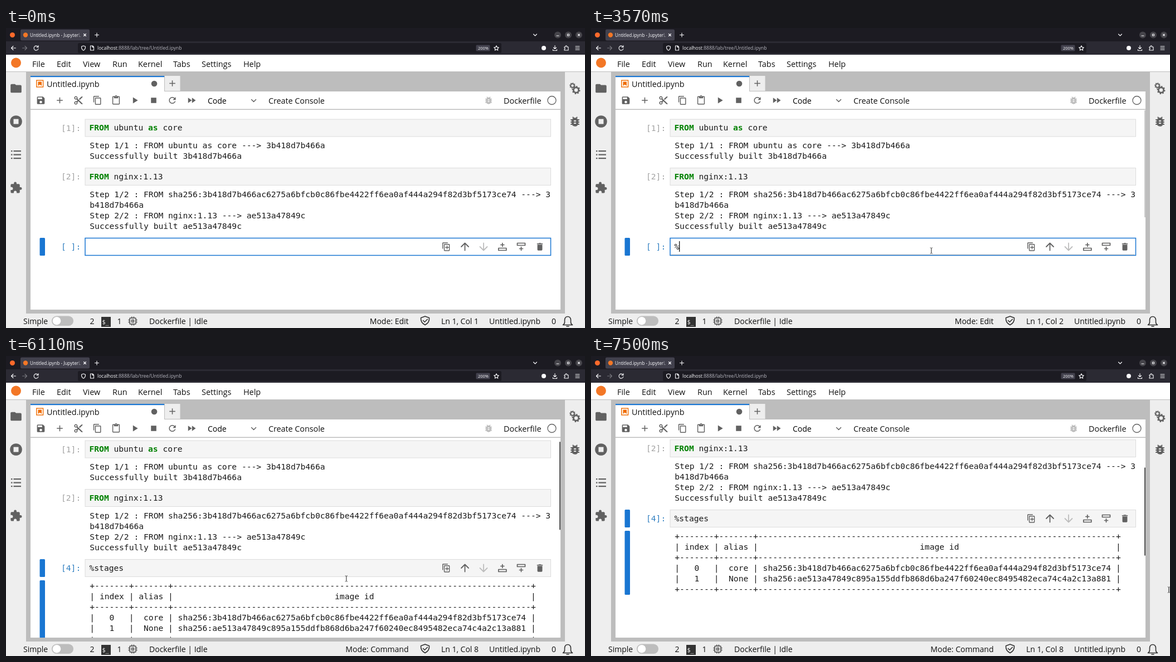
An HTML page for the animation above (8.44 s loop, 1039 by 539 pixels).

```html
<!DOCTYPE html>
<html lang="en">
<head>
<meta charset="utf-8">
<title>Notebook stages</title>
<style>
html, body { margin: 0; width: 100%; height: 100%; overflow: hidden; background: #fff; }
svg { display: block; }
text { white-space: pre; font-family: "Open Sans", "Noto Sans", sans-serif; }
.mono { font-family: "DejaVu Sans Mono", monospace; font-size: 14.617px; }
.kw { fill: #008000; font-weight: bold; }
.line { fill: none; stroke-linecap: round; stroke-linejoin: round; }
</style>
</head>
<body>
<svg id="stage" width="1039" height="539" viewBox="0 0 1039 539">
  <defs><clipPath id="view"><rect x="44" y="147" width="951" height="359"/></clipPath></defs>
</svg>
<script>
const LOOP = 8440, CHAR = 8.8, GREY = '#616161', BLUE = '#1976d2';
const stage = document.getElementById('stage');

const rect = (x, y, w, h, fill, more = '') =>
  `<rect x="${x}" y="${y}" width="${w}" height="${h}" fill="${fill}" ${more}/>`;
const circle = (x, y, r, fill, more = '') =>
  `<circle cx="${x}" cy="${y}" r="${r}" fill="${fill}" ${more}/>`;
const text = (x, y, s, size = 14.4, fill = '#111', more = '') =>
  `<text x="${x}" y="${y}" font-size="${size}" fill="${fill}" ${more}>${s}</text>`;
const mono = (x, y, s, fill = '#1a1a1a', more = '') =>
  `<text class="mono" x="${x}" y="${y}" fill="${fill}" ${more}>${s}</text>`;
const line = (d, color = GREY, width = 1.8, more = '') =>
  `<path class="line" d="${d}" stroke="${color}" stroke-width="${width}" ${more}/>`;
// Filled icon on a 24 unit grid, centred on x, y
const icon = (d, x, y, scale = .76, fill = GREY) =>
  `<path d="${d}" fill="${fill}" fill-rule="evenodd" transform="translate(${x} ${y}) scale(${scale}) translate(-12 -12)"/>`;

const SAVE = 'M17 3H5c-1.11 0-2 .9-2 2v14c0 1.1.89 2 2 2h14c1.1 0 2-.9 2-2V7l-4-4zm-5 16c-1.66 0-3-1.34-3-3s1.34-3 3-3 3 1.34 3 3-1.34 3-3 3zm3-10H5V5h10v4z';
const PLUS = 'M19 13h-6v6h-2v-6H5v-2h6V5h2v6h6v2z';
const CUT = 'M9.64 7.64c.23-.5.36-1.05.36-1.64 0-2.21-1.79-4-4-4S2 3.79 2 6s1.79 4 4 4c.59 0 1.14-.13 1.64-.36L10 12l-2.36 2.36C7.14 14.13 6.59 14 6 14c-2.21 0-4 1.79-4 4s1.79 4 4 4 4-1.79 4-4c0-.59-.13-1.14-.36-1.64L12 14l7 7h3v-1L9.64 7.64zM6 8a2 2 0 1 1 0-4 2 2 0 0 1 0 4zm0 12a2 2 0 1 1 0-4 2 2 0 0 1 0 4zM19 3l-6 6 2 2 7-7V3z';
const COPY = 'M16 1H4c-1.1 0-2 .9-2 2v14h2V3h12V1zm3 4H8c-1.1 0-2 .9-2 2v14c0 1.1.9 2 2 2h11c1.1 0 2-.9 2-2V7c0-1.1-.9-2-2-2zm0 16H8V7h11v14z';
const PASTE = 'M19 2h-4.18C14.4.84 13.3 0 12 0c-1.3 0-2.4.84-2.82 2H5c-1.1 0-2 .9-2 2v16c0 1.1.9 2 2 2h14c1.1 0 2-.9 2-2V4c0-1.1-.9-2-2-2zm-7 0a1 1 0 1 1 0 2 1 1 0 0 1 0-2zm7 18H5V4h2v3h10V4h2v16z';
const REFRESH = 'M17.65 6.35C16.2 4.9 14.21 4 12 4c-4.42 0-7.99 3.58-7.99 8s3.57 8 7.99 8c3.73 0 6.84-2.55 7.73-6h-2.08c-.82 2.33-3.04 4-5.65 4-3.31 0-6-2.69-6-6s2.69-6 6-6c1.66 0 3.14.69 4.22 1.78L13 11h7V4l-2.35 2.35z';
const FORWARD = 'M4 18l8.5-6L4 6v12zm9-12v12l8.5-6L13 6z';
const BUG = 'M20 8h-2.81c-.45-.78-1.07-1.45-1.82-1.96L17 4.41 15.59 3l-2.17 2.17C12.96 5.06 12.49 5 12 5c-.49 0-.96.06-1.41.17L8.41 3 7 4.41l1.62 1.63C7.88 6.55 7.26 7.22 6.81 8H4v2h2.09c-.05.33-.09.66-.09 1v1H4v2h2v1c0 .34.04.67.09 1H4v2h2.81c1.04 1.79 2.97 3 5.19 3s4.15-1.21 5.19-3H20v-2h-2.09c.05-.33.09-.66.09-1v-1h2v-2h-2v-1c0-.34-.04-.67-.09-1H20V8zm-6 8h-4v-2h4v2zm0-4h-4v-2h4v2z';
const FOLDER = 'M10 4H4c-1.1 0-2 .9-2 2v12c0 1.1.9 2 2 2h16c1.1 0 2-.9 2-2V8c0-1.1-.9-2-2-2h-8l-2-2z';
const PUZZLE = 'M20.5 11H19V7c0-1.1-.9-2-2-2h-4V3.5a2.5 2.5 0 0 0-5 0V5H4c-1.1 0-2 .9-2 2v3.8h1.5a2.7 2.7 0 0 1 0 5.4H2V20c0 1.1.9 2 2 2h3.8v-1.5a2.7 2.7 0 0 1 5.4 0V22H17c1.1 0 2-.9 2-2v-4h1.5a2.5 2.5 0 0 0 0-5z';
const CHIP = 'M15 9H9v6h6V9zm-2 4h-2v-2h2v2zm8-2V9h-2V7c0-1.1-.9-2-2-2h-2V3h-2v2h-2V3H9v2H7c-1.1 0-2 .9-2 2v2H3v2h2v2H3v2h2v2c0 1.1.9 2 2 2h2v2h2v-2h2v2h2v-2h2c1.1 0 2-.9 2-2v-2h2v-2h-2v-2h2zm-4 6H7V7h10v10z';
const TRASH = 'M6 19c0 1.1.9 2 2 2h8c1.1 0 2-.9 2-2V7H6v12zM19 4h-3.5l-1-1h-5l-1 1H5v2h14V4z';

const gear = (x, y, r) =>
  circle(x, y, r, 'none', `stroke="${GREY}" stroke-width="${r * .6}"`) +
  circle(x, y, r * 1.4, 'none', `stroke="${GREY}" stroke-width="${r * .45}" pathLength="16" stroke-dasharray="1 1"`);

function browser() {
  const ink = '#fbfbfe', thin = (d, c = ink) => line(d, c, 1.1);
  return rect(0, 0, 1039, 24, '#1c1b22') + rect(0, 24, 1039, 24, '#2b2a33') +
    circle(11.5, 12.5, 4.5, '#ff6a2b') +
    rect(26, 2.5, 124, 20, '#42414d', 'rx="2.5"') + circle(35, 12.5, 4.2, '#f37726') +
    text(43, 15.6, 'Untitled.ipynb - Jupyter<tspan fill="#99989f">L</tspan>', 8.15, ink) +
    thin('M139.5 10.5l4 4m0-4l-4 4M159.5 12.5h7m-3.5-3.5v7M946.500 11l3 3 3-3') +
    [990, 1009, 1028].map(x => circle(x, 12.500, 6, '#45444a')).join('') +
    thin('M988 14h4M1007.500 11h3v3h-3zM1026.500 11l3 3m0-3l-3 3') +
    thin('M17.500 36h-8m3.500-3.500l-3.500 3.500 3.500 3.500M57.500 34a4 4 0 1 0 .5 3M58 31.500v3h-3') +
    thin('M29.500 36h8m-3.500-3.500l3.500 3.500-3.500 3.500', '#77767e') +
    rect(129, 27, 760, 18, '#1c1b22', 'rx="2.5"') +
    thin('M139 32l3.500 1.200q.3 5-3.500 7-3.800-2-3.500-7zM151.500 32h4l2 2v6h-6zM155 32v2.500h2.500') +
    text(164, 39, 'localhost<tspan fill="#b5b5be">:8888/lab/tree/Untitled.ipynb</tspan>', 8.57, ink) +
    rect(843.5, 30.500, 25, 11, '#42414d', 'rx="1.5"') + text(847, 39, '200%', 7.4, ink) +
    thin('M880 31.800l1.300 2.800 3 .4-2.200 2.100.6 3-2.700-1.500-2.700 1.500.6-3-2.200-2.100 3-.4z') +
    circle(965, 36, 4, ink) +
    thin('M985 31.500v6m-2.500-2.500l2.500 2.500 2.500-2.500M981.500 38.500v2h7v-2') +
    thin('M1002 34h2v-1.500q1.500-1.500 2.500 0V34h2.500v6h-7v-2q2.500-1 0-2.500z') +
    thin('M1022 33h7m-7 3h7m-7 3h7');
}

function shell() {
  const menu = [[47, 'File'], [91, 'Edit'], [138, 'View'], [191, 'Run'], [237, 'Kernel'],
    [300, 'Tabs'], [351, 'Settings'], [426, 'Help']];
  const rows = [221, 227.500, 234];
  return rect(0, 48, 1039, 31, '#fff') + circle(18, 62.500, 9, '#f37726') +
    menu.map(([x, s]) => text(x, 69.600, s)).join('') +
    rect(0, 78, 1039, 435, '#bdbdbd') +
    rect(0, 79, 36, 434, '#eee') + rect(1003, 79, 36, 434, '#eee') +
    icon(FOLDER, 18, 108.500, .98) +
    circle(18, 168, 10.800, GREY) + rect(13.500, 163.500, 9, 9, '#eee') +
    rows.map(y => rect(9, y - 1, 2.500, 2.200, GREY) + rect(13.500, y - 1, 13.500, 2.200, GREY)).join('') +
    icon(PUZZLE, 18, 287, .96) +
    gear(1016.500, 103.500, 3.300) + gear(1023, 111.500, 4.600) + icon(BUG, 1021, 168, .98) +
    // document tabs
    rect(44, 86, 240, 28, '#fff') + rect(44, 86, 240, 2.200, BLUE) +
    rect(54.800, 94, 11.800, 12, 'none', 'stroke="#ef6c00" stroke-width="1.4"') +
    '<path d="M57.500 96.500h6.500v7.500l-3.250-2.500-3.250 2.500z" fill="#ef6c00"/>' +
    text(73, 105.500, 'Untitled.ipynb') + circle(266, 100, 5.300, GREY) +
    rect(285, 86, 27.500, 27, '#eee') + icon(PLUS, 298.500, 99.500) +
    rect(44, 114, 951, 392, '#fff');
}

function toolbar() {
  return rect(44, 114, 951, 32, '#fff') + rect(44, 145.500, 951, 1.500, '#bdbdbd') +
    icon(SAVE, 62.500, 130) + icon(PLUS, 96.500, 130) + icon(CUT, 130, 130) +
    icon(COPY, 164, 130, .72) + icon(PASTE, 197.500, 130, .74) +
    icon('M8 5v14l11-7z', 231, 130, .8) + icon('M6 6h12v12H6z', 265, 130, .8) +
    icon(REFRESH, 298.500, 130) + icon(FORWARD, 333, 130, .78) +
    text(362, 135.500, 'Code', 14, '#000') + line('M440.500 128.500l4 4 4-4', GREY, 1.500) +
    text(471, 135.500, 'Create Console', 14.300) +
    icon(BUG, 866, 130, .74, '#bdbdbd') + text(893, 135.500, 'Dockerfile') +
    circle(979.500, 130, 7.500, 'none', `stroke="${GREY}" stroke-width="1.300"`);
}

function statusBar() {
  const say = (x, s, more) => text(x, 531.500, s, 14, '#111', more);
  return rect(0, 513, 1039, 26, '#eee') + say(31, 'Simple') +
    rect(82, 517.500, 39, 17.500, '#bdbdbd', 'rx="8.75"') + circle(91, 526.200, 7.300, '#fff') +
    say(150.500, '2') + rect(171, 519, 17, 18, '#333') + mono(172.500, 532, '$_', '#fff', 'style="font-size:10px"') +
    say(199.500, '1') + icon(CHIP, 227.500, 526.500, .9) + say(257, 'Dockerfile | Idle') +
    say(722.500, '', 'id="mode" text-anchor="end"') +
    line('M752 518l7.500 2.800q.8 8.500-7.500 12.700-8.300-4.200-7.500-12.700zM748.500 525.500l2.800 2.800 5-5', '#333', 1.600) +
    say(781, '', 'id="column"') + say(867, 'Untitled.ipynb') + say(979, '0') +
    line('M999.500 533.500q3-2 3-5v-4q.5-6 5.500-6t5.500 6v4q0 3 3 5zM1006 536h4', '#333', 1.600);
}

const SHA1 = 'sha256:3b418d7b466ac6275a6bfcb0c86fbe4422ff6ea0af444a294f82d3bf5173ce74';
const SHA2 = 'sha256:ae513a47849c895a155ddfb868d6ba247f60240ec8495482eca74c4a2c13a881';
const kw = s => `<tspan class="kw">${s}</tspan>`;
const prompt = (y, s, fill, more) => mono(99, y, s, fill, more);
const output = (y, rows) => rows.map((s, i) => mono(150.300, y + 19 * i, s.replace(/>/g, '&gt;'))).join('');
const inputBox = (y, more = '') => rect(142, y, 835.500, 31, '#f5f5f5', 'stroke="#dcdcdc" ' + more);

function cellTools() {
  return icon(COPY, 790, 393, .7) + line('M791.500 391.500v5.500m-2.750-2.750h5.500', GREY, 1.300) +
    line('M823.500 399.500v-13m-6.500 6.500l6.500-6.500 6.500 6.500') +
    line('M857 386.500v13m-6.500-6.500l6.500 6.500 6.500-6.500', '#bdbdbd') +
    line('M883.800 395.500h14v4h-14zM890.800 392.500v-6m-3 3h6', GREY, 1.700) +
    line('M917.500 386.500h14v4h-14zM924.500 393.500v6m-3-3h6', GREY, 1.700) +
    icon(TRASH, 958, 393, .74);
}

function notebook() {
  const dash = n => '-'.repeat(n), gap = n => ' '.repeat(n);
  const rule = `+${dash(7)}+${dash(7)}+${dash(73)}+`;
  const table = [rule, `| index | alias |${gap(33)}image id${gap(32)}|`, rule,
    `|   0   |  core | ${SHA1} |`, `|   1   |  None | ${SHA2} |`, rule];
  return `<g clip-path="url(#view)"><g id="page">` +
    prompt(184.500, '[1]:', '#a3a3a3') + inputBox(164) +
    mono(149.500, 184.300, `${kw('FROM')} ubuntu ${kw('as')} core`) +
    output(216.300, ['Step 1/1 : FROM ubuntu as core ---> 3b418d7b466a', 'Successfully built 3b418d7b466a']) +
    prompt(272, '[2]:', '#a3a3a3') + inputBox(251.500) +
    mono(149.500, 271.800, `${kw('FROM')} nginx:1.13`) +
    output(303.800, [`Step 1/2 : FROM ${SHA1} ---> 3`, 'b418d7b466a',
      'Step 2/2 : FROM nginx:1.13 ---> ae513a47849c', 'Successfully built ae513a47849c']) +
    rect(60.500, 377, 9.500, 32, BLUE, 'rx="1.500"') +
    prompt(398, '', '#307fc1', 'id="prompt"') + inputBox(377.500, 'id="box"') +
    line('M144 407.300h832', '#777', 1, 'id="dots" style="stroke-dasharray:1 1;stroke-linecap:butt"') +
    mono(149.500, 397.800, '', '#1a1a1a', 'id="code"') +
    rect(0, 383, 1.200, 19, '#000', 'id="caret"') + cellTools() +
    `<g id="result">${rect(60.500, 415, 9.500, 115, BLUE, 'rx="1.500"')}${output(429.800, table)}</g>` +
    `</g>${rect(993, 148, 2, 192, '#555', 'id="thumb"')}</g>`;
}

stage.insertAdjacentHTML('beforeend', browser() + shell() + notebook() + toolbar() + statusBar() +
  line('M-1.800-5.200q1.800 0 1.800 1.200v8q0 1.200-1.800 1.200M1.800-5.200q-1.800 0-1.800 1.200v8q0 1.200 1.800 1.200', '#555', 1, 'id="mouse"'));

const el = id => document.getElementById(id);
const set = (id, attrs) => Object.entries(attrs).forEach(([k, v]) => el(id).setAttribute(k, v));
const show = (id, on) => set(id, { opacity: +on });
// Value of the last step already reached
const step = (t, steps) => steps.filter(s => s[0] <= t).pop()[1];

function draw(t) {
  const typed = step(t, [[0, 0], [3570, 1], [3800, 3], [3980, 6], [4150, 7]]);
  const scroll = step(t, [[0, 0], [6110, 12], [6180, 62], [6350, 101]]);
  const mouse = step(t, [[0, [-50, 0]], [1450, [740, 400]], [1550, [665, 400]], [1650, [630, 400]],
    [1750, [614, 400]], [1850, [610.700, 400]], [6600, [609, 400.500]], [6680, [607, 401.500]],
    [6750, [605, 402.500]], [6830, [603.500, 402.500]], [7500, [1037, 420]]]);
  const running = t >= 4910, done = t >= 5220;

  set('page', { transform: `translate(0 ${-scroll})` });
  set('box', running ? { fill: '#f5f5f5', stroke: '#dcdcdc', 'stroke-width': 1 }
    : { fill: '#fff', stroke: BLUE, 'stroke-width': 1.500 });
  set('mouse', { transform: `translate(${mouse})` });
  set('caret', { x: 149.300 + CHAR * typed });
  set('thumb', { y: 148 + scroll * .52, height: done ? 158 : 192 });
  show('thumb', 0);
  set('thumb', { opacity: step(t, [[0, 0], [1450, 1], [3400, .6], [3570, .3], [3640, 0], [5220, 1]]) });
  show('caret', step(t, [[0, 0], [2040, 1], [2440, 0], [2950, 1], [4740, 0]]));
  show('dots', t >= 2040 && !running);
  show('result', done);
  el('code').textContent = '%stages'.slice(0, typed);
  el('prompt').textContent = done ? '[4]:' : running ? '[*]:' : '[ ]:';
  el('mode').textContent = running ? 'Mode: Command' : 'Mode: Edit';
  el('column').textContent = `Ln 1, Col ${typed + 1}`;
}

const start = performance.now();
function tick() {
  draw((performance.now() - start) % LOOP);
  requestAnimationFrame(tick);
}
tick();
</script>
</body>
</html>
```
